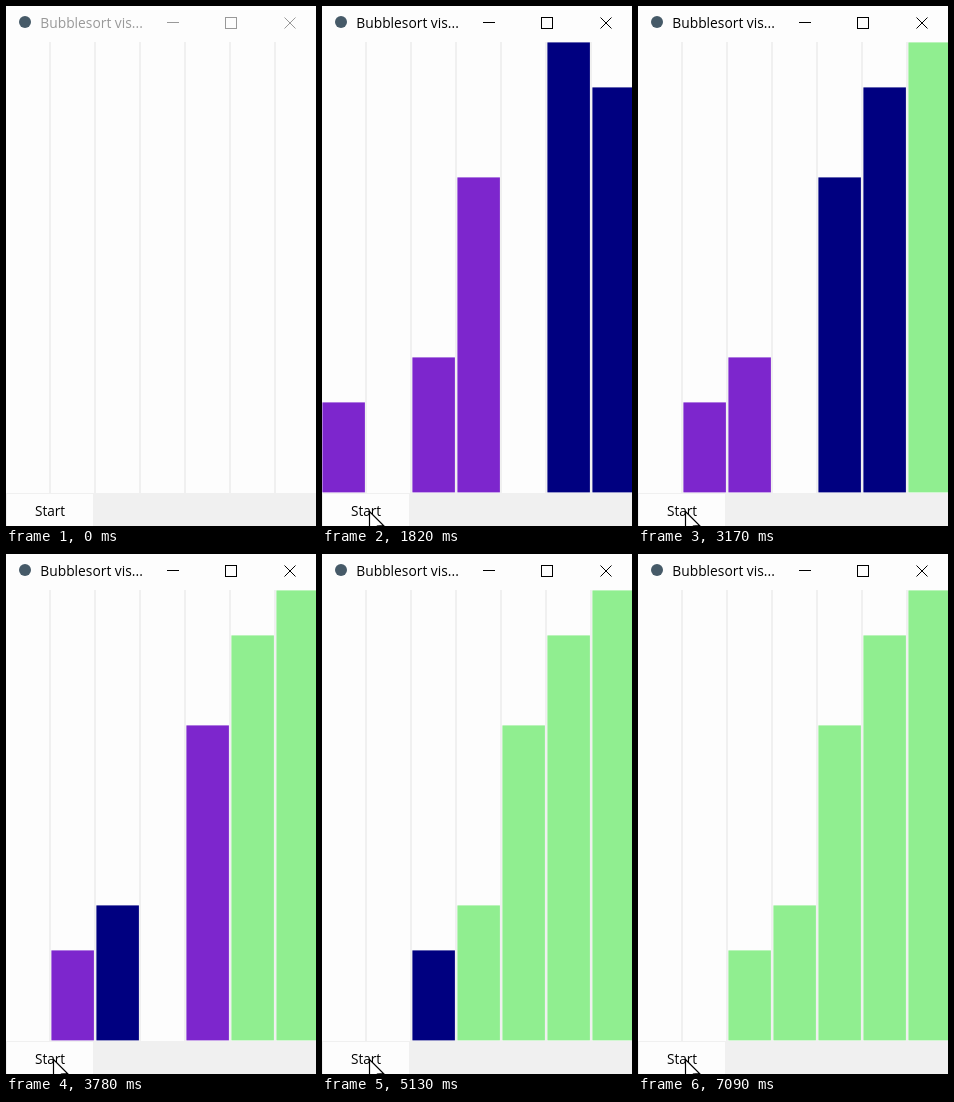
Animation of 310 by 520 pixels, one loop 7.17 s. Source, as an HTML page with a canvas:

```html
<!DOCTYPE html>
<html lang="en">
<head>
<meta charset="utf-8">
<title>Bubblesort visualizer</title>
<style>
  html, body { margin: 0; width: 310px; height: 520px; overflow: hidden; background: #fdfdfd; }
  canvas { display: block; }
</style>
</head>
<body>
<canvas id="stage" width="310" height="520"></canvas>
<script>
const ctx = document.getElementById('stage').getContext('2d');
const LOOP = 7170, PRESS = 450, START = 604, STEP = 168;
const FLOOR = 486.4, UNIT = 45;
const COLORS = {
  paper: '#fdfdfd', face: '#f0f0f0',
  idle: '#7d26cd', active: '#000080', done: '#90ee90'
};
const FONT = '"Open Sans", "Noto Sans", sans-serif';

// Every comparison is shown once, and once more if it swaps.
function sortSteps(values) {
  const a = values.slice(), steps = [];
  const snap = (pair, done) => steps.push({ values: a.slice(), pair, done });
  for (let end = a.length - 1; end > 0; end--) {
    for (let j = 0; j < end; j++) {
      snap(j, end + 1);
      if (a[j] > a[j + 1]) {
        [a[j], a[j + 1]] = [a[j + 1], a[j]];
        snap(j, end + 1);
      }
    }
  }
  snap(-9, 0);
  return steps;
}
const steps = sortSteps([2, 3, 0, 7, 10, 0, 9]);

function box(color, x, y, w, h) {
  ctx.fillStyle = color;
  ctx.fillRect(x, y, w, h);
}

function label(text, x, y, size, color) {
  ctx.font = size + 'px ' + FONT;
  ctx.fillStyle = color;
  ctx.fillText(text, x, y);
}

function path(points, close) {
  ctx.beginPath();
  points.forEach(([x, y]) => ctx.lineTo(x, y));
  if (close) ctx.closePath();
}

function titleBar(focused) {
  const ink = focused ? '#000' : '#999';
  ctx.fillStyle = '#465a68';
  ctx.beginPath();
  ctx.arc(19, 16, 6, 0, Math.PI * 2);
  ctx.fill();
  label('Bubblesort vis...', 34.3, 22, 13.8, ink);

  ctx.strokeStyle = ink;
  ctx.lineWidth = 1;
  path([[161, 16.5], [173, 16.5]]);
  ctx.stroke();
  ctx.strokeRect(219.5, 11.5, 11, 11);
  path([[278.5, 11.5], [289.5, 22.5]]);
  ctx.stroke();
  path([[289.5, 11.5], [278.5, 22.5]]);
  ctx.stroke();
}

function chart(t) {
  for (let i = 1; i < 7; i++) box(COLORS.face, i * UNIT - 2, 36, 2, 451);
  if (t < START) return;
  const n = Math.min(steps.length - 1, Math.floor((t - START) / STEP));
  const { values, pair, done } = steps[n];
  values.forEach((v, i) => {
    const state = i === pair || i === pair + 1 ? 'active' : i >= done ? 'done' : 'idle';
    box(COLORS[state], i * UNIT + 0.4, FLOOR - v * UNIT, 42.5, v * UNIT);
  });
}

function footer() {
  box(COLORS.face, 0, 487, 310, 1);
  box(COLORS.face, 0, 488, 1, 32);
  box(COLORS.face, 87, 488, 223, 32);
  label('Start', 29, 510, 13.6, '#000');
}

function pointer(t) {
  if (t < 100) return;
  const enter = 1 - Math.min(1, (t - 100) / 300);
  const drift = Math.min(1, Math.max(0, (t - 1100) / 400));
  ctx.save();
  ctx.translate(49.5 - 2 * drift + 12 * enter * enter, 505.5 + 16 * enter * enter);
  path([[0, 0], [0, 20], [4.5, 16], [8, 24], [11, 23], [8, 14.5], [14, 14]], true);
  ctx.fillStyle = '#fff';
  ctx.fill();
  ctx.strokeStyle = '#000';
  ctx.lineWidth = 1.2;
  ctx.stroke();
  ctx.restore();
}

function draw(t) {
  box(COLORS.paper, 0, 0, 310, 520);
  titleBar(t >= PRESS);
  chart(t);
  footer();
  pointer(t);
}

const origin = performance.now();
function tick() {
  draw((performance.now() - origin) % LOOP);
  requestAnimationFrame(tick);
}
draw(0);
requestAnimationFrame(tick);
</script>
</body>
</html>
```
